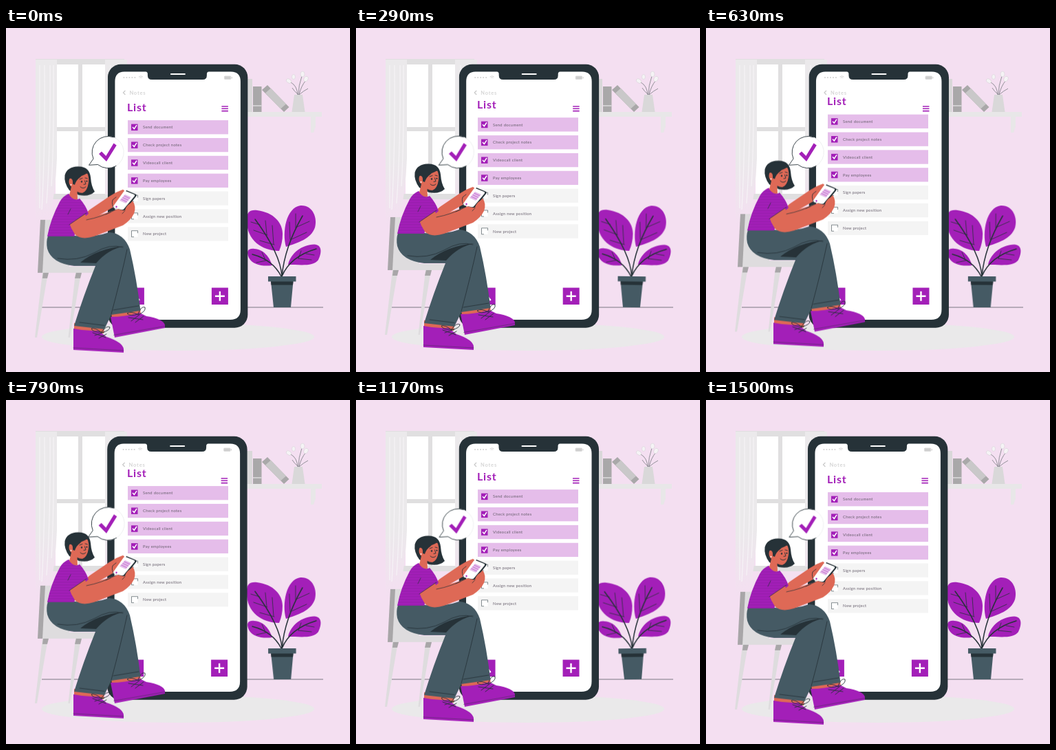
An HTML page that plays this animation: 500 px wide and 500 px high, repeating every 1540 ms.

```html
<!DOCTYPE html>
<html lang="en">
<head>
<meta charset="utf-8">
<title>Checklist</title>
<style>
html, body { margin: 0; width: 100%; height: 100%; overflow: hidden; background: #f4dff1; }
svg { display: block; width: 100vw; height: 100vh; }
text { font-family: Lato, "Open Sans", sans-serif; }
.ink { fill: #263238; }
.slate { fill: #455a64; }
.accent { fill: #a31fb8; }
.skin { fill: #de6956; }
.line { fill: none; stroke: #263238; stroke-linecap: round; stroke-linejoin: round; }
.shake, .float, .wind, .beat { animation: 1.54s linear infinite; }
.shake { animation-name: shake; }
.float { animation-name: float; }
.wind { animation-name: wind; transform-origin: 404px 332px; }
.beat { animation-name: beat; transform-origin: 148px 199px; }
@keyframes shake {
  0% { transform: translateX(-.1px); }
  8.6%, 86.6% { transform: translateX(-1px); }
  18.4%, 76.8% { transform: translateX(2px); }
  28.1%, 47.6%, 67.1% { transform: translateX(-4px); }
  37.9%, 57.3% { transform: translateX(4px); }
  96.3% { transform: none; }
  100% { transform: translateX(-.3px); }
}
@keyframes float {
  0% { transform: translateY(-.2px); }
  47.6% { transform: translateY(-10px); }
  96.3% { transform: translateY(0); }
  100% { transform: translateY(-.7px); }
}
@keyframes wind {
  0% { transform: rotate(.04deg); }
  23.3% { transform: rotate(1deg); }
  72% { transform: rotate(-1deg); }
  96.3% { transform: rotate(0deg); }
  100% { transform: rotate(.15deg); }
}
@keyframes beat {
  0% { transform: scale(1); }
  18.8% { transform: scale(1.01); }
  32.5% { transform: scale(.97); }
  51.3% { transform: scale(1.04); }
  65% { transform: scale(.97); }
  76%, 97.4% { transform: scale(.985); }
  100% { transform: scale(1); }
}
</style>
</head>
<body>
<svg viewBox="0 0 500 500">
  <defs>
    <pattern id="knit" width="8" height="4" patternUnits="userSpaceOnUse">
      <rect width="8" height="4" fill="#a31fb8"/>
      <path d="M0 2H8" stroke="#8a1a9c" stroke-width=".6"/>
    </pattern>
    <linearGradient id="drape" x2="0" y2="1">
      <stop offset=".6" stop-color="#ebe9eb"/>
      <stop offset="1" stop-color="#f4dff1"/>
    </linearGradient>
  </defs>

  <!-- window -->
  <g>
    <path fill="#fff" d="M72 52H146V242H72Z"/>
    <path fill="#e0dfe0" d="M43 45H172V53H43ZM105 53H111V242H105ZM72 144H148V150H72ZM60 241H150V249H60Z"/>
    <path fill="url(#drape)" d="M43 46H74V190Q72 240 62 285H43ZM144 46H176V242H144Z"/>
    <path d="M49 54V262M56 54Q57 180 52 264M64 54Q65 170 59 255M69 54Q70 160 66 230M152 54V236" fill="none" stroke="#f6f3f6" stroke-width="1.2"/>
  </g>

  <!-- shelf -->
  <g>
    <path fill="#e8e7e8" d="M340 122H459V129H340ZM443 129H450V143L447 152H443Z"/>
    <path fill="#d9d8d9" d="M340 74H358V122H340Z"/>
    <path fill="#a9a8a9" d="M359 85H371.500V122H359ZM372 90L380 83L411.500 115L404 122Z"/>
    <path fill="#c9c8c9" d="M377 94.500L385 87.500L407 110.500L399 117.500Z"/>
    <path d="M359 113H371.500" stroke="#dcdbdc" stroke-width="1.500"/>
    <path fill="#d9d8d9" d="M419 97H431L434.500 122H415.500Z"/>
    <path d="M424 97Q423 84 414 79M425 97Q425 84 430 70M426 97Q429 84 436 76M425 97Q418 91 416 87M426 97Q433 91 439 88" fill="none" stroke="#6b7074" stroke-width=".7"/>
    <g fill="#f5f3f5" stroke="#d2ced2" stroke-width=".5">
      <ellipse cx="411" cy="77" rx="4" ry="2.800" transform="rotate(35 411 77)"/>
      <ellipse cx="431" cy="67" rx="3" ry="4"/>
      <ellipse cx="436" cy="74" rx="3" ry="4" transform="rotate(30 436 74)"/>
      <ellipse cx="418" cy="71" rx="2.500" ry="3.500"/>
    </g>
  </g>

  <path d="M52 406H461" stroke="#263238" stroke-width=".6"/>
  <ellipse cx="250" cy="449" rx="198" ry="20" fill="#eae9ea"/>

  <!-- plant -->
  <g class="wind">
    <g class="accent">
      <path d="M397 324C372 324 350 308 350 281C349 267 355 264 365 265C389 268 402 283 402 299Q402 313 397 324Z"/>
      <path d="M407 318C401 297 407 261 428 258C446 257 453 276 449 290C443 307 424 312 407 318Z"/>
      <path d="M387 345C373 347 358 344 353 334C349 325 351 320 361 321C375 322 383 333 387 345Z"/>
      <path d="M410 344C414 327 430 315 448 314.500C460 315 459 327 454 337C447 347 428 344 410 344Z"/>
    </g>
    <path class="line" stroke-width="1.500" d="M401 361Q399 328 362 278M401 361Q405 318 431 273M400 361Q388 337 358 329M401 361Q413 332 451 321"/>
    <path class="line" stroke-width=".8" d="M389 314L387 287M379 300L377 280M390 315L369 309M380 301L360 294M369 286L356 282M413 307L412 282M421 290L421 270M413 308L437 297M421 290L441 281M377 337L372 326M378 338L364 341M425 335L429 324M425 335L444 337M436 328L448 330"/>
    <path class="slate" d="M381 361H421.500V368.500H381ZM385 368H417.500L414 406H389Z"/>
    <path class="ink" d="M385 368.500H417.500L417 373.500H385.500Z"/>
  </g>

  <!-- large phone -->
  <g class="shake">
    <rect class="ink" x="148" y="52.700" width="203.500" height="383" rx="19"/>
    <path fill="#fff" d="M172 63.500H203Q206 63.500 206 67V69Q206 75 212 75H286Q292 75 292 69V67Q292 63.500 295 63.500H327Q341 63.500 341 78V409Q341 424 326 424H173Q158.500 424 158.500 409V78Q158.500 63.500 172 63.500Z"/>
    <path d="M240 67H260" stroke="#fff" stroke-width="2" stroke-linecap="round"/>
    <path d="M171.500 72H189" stroke="#d4d4d4" stroke-width="2.200" stroke-linecap="round" stroke-dasharray="0 4"/>
    <path d="M193 71Q196 68.500 199 71M194.300 72.500Q196 71 197.700 72.500" fill="none" stroke="#d6d6d6"/>
    <rect x="317.500" y="70" width="9.500" height="4.500" rx="1" fill="#cfcfcf" stroke="#dcdcdc"/>
    <path d="M328.500 71V73.500" stroke="#d2d2d2"/>
    <path d="M173.500 91L170.500 94L173.500 97" fill="none" stroke="#c8c8c8" stroke-width="1.200"/>
    <text x="179.500" y="96.500" font-size="7.500" font-weight="700" letter-spacing=".8" fill="#d6d6d6">Notes</text>
    <path d="M313.500 114H323M313.500 117.300H323M313.500 120.600H323" stroke="#a31fb8" stroke-width="1.600"/>
    <path class="accent" d="M177 377.500H201V402H177ZM299 377.500H323V402H299Z"/>
    <path d="M304 389.700H318M311 382.700V396.700M184 383L194 396" stroke="#fff" stroke-width="2.400"/>
  </g>

  <!-- list -->
  <g class="float">
    <text class="accent" x="176" y="121" font-size="16" font-weight="700" letter-spacing=".8">List</text>
    <g id="rows"></g>
  </g>

  <!-- speech bubble -->
  <g class="beat">
    <path fill="#fff" d="M127 190L120.500 199.300L133.500 198.500A23.300 23.300 0 1 0 127 190Z"/>
    <path class="line" stroke-width=".9" d="M160 200.500A23.300 23.300 0 0 1 133.500 198.500L120.500 199.300L127 190A23.300 23.300 0 0 1 156 158.700"/>
    <path class="line" stroke-width=".5" opacity=".15" d="M156 158.700A23.300 23.300 0 0 1 160 200.500"/>
    <path class="accent" d="M135 183L139 179.500L145.300 186L156.500 167.500L160.700 170.500L146 194Z"/>
  </g>

  <!-- woman on chair -->
  <g class="float">
    <path fill="#dedcde" d="M53 279H92V347H129V356H47Z"/>
    <path fill="#a8a6a8" d="M50 279H57L53 356H46Z"/>
    <path fill="#dedcde" d="M53 356H61L45 450H42ZM101 356H109L93 450H90.500Z"/>
    <path fill="#a8a6a8" d="M54 356H62L60 364H53ZM102 356H110L108 364H100Z"/>

    <path class="skin" d="M99 429L143 435L142 444H99ZM153 413L195 407L196 418L154 423Z"/>
    <path class="accent" d="M98 437Q116 441 134 440L146 449Q170 457 171 467V472L98 468Z"/>
    <path class="accent" d="M152 420Q173 420 194 414L204 419Q229 423 231 432V436L158 450Z"/>
    <path class="line" stroke-width=".4" d="M98 465L171 469M156.500 446.500L231 433.500"/>
    <path class="line" stroke-width=".9" d="M126 443L145 450M129 447L143 442M135 451L146 445M139 442Q146 432 151 435Q151 440 139 443Q129 435 124 437Q126 443 139 442M178 421L199 424M182 426L194 417M188 428L200 419M192 416Q196 404 202 406Q204 412 192 417Q182 411 176 415Q180 420 192 416"/>
    <path class="slate" d="M61 302H99Q128 305 150 297Q172 299 180 322Q190 365 195.500 411L153 417L143 438L99 433Q113 388 130 346L99 346Q66 342 60 321Q58 311 61 302Z"/>
    <path class="ink" d="M108 341Q132 321 172 317Q148 322 131 342Z"/>
    <path class="line" stroke-width=".8" d="M75 335Q104 340 128 327Q151 313 170 319M176 322Q168 360 153 416M107 428L143 432.500M156 410L193 404"/>

    <path class="skin" d="M112 273L122 264L150 245Q163 237 170 235Q175 238 171 242L157 260L120 281Z"/>
    <path fill="url(#knit)" d="M91 241L97 247Q102 251 107 248Q116 258 120 270L107 281L99 303H60Q65 277 78 253Q82 245 91 241Z"/>
    <path class="skin" d="M91 281L113 266Q115 274 120 276Q148 269 163 263Q174 251 183 250Q190 259 186 270Q181 280 170 287L128 303Q109 309 100 300Q94 291 91 281Z"/>
    <path fill="url(#knit)" d="M98 253Q111 252 117 269L92 286Q86 271 98 253Z"/>
    <path class="line" stroke-width=".7" d="M92 286L117 269M117 279Q139 275 160 264M90 271L94 263M169 270Q176 263 180 257M145 271L152 268"/>

    <path class="ink" d="M175 236L188 241.500Q191 243 189 245L174 264Q172 266 169 265L158 262Z"/>
    <path fill="#fff" d="M173.500 237L186 242Q188 243 186.500 245L171.500 263Q170 265 167 264L157 262Q154.500 261 156 259L171 238Q172 236.500 173.500 237Z"/>
    <path fill="#e5bdea" d="M173 242L182 246L174 255L165 251Z"/>
    <path d="M171.500 244L180 248M169.500 246.500L178 250.500M167.500 249L176 253" stroke="#a31fb8" stroke-width=".5"/>
    <circle class="accent" cx="160.500" cy="260" r="1.200"/>
    <path class="skin" d="M173 265Q174 259 182 254L186 257Q186 266 179 271Z"/>
    <path class="line" stroke-width=".8" d="M157 262Q153 257 155 250L160 246"/>

    <!-- head -->
    <path class="ink" d="M104 201.500C117 201 122 208 123 217Q124 231 129 238Q121 246 106 243L92 236Q84 225 85.500 214Q89 202 104 201.500Z"/>
    <path class="skin" d="M98 215Q110 217 118 211Q121 217 120 225Q118 238 111 240Q107 240 103.500 238L104 249Q98 251 92 243L95 231Q90 227 92 220Q94 216 98 218Z"/>
    <path class="ink" d="M89 216Q91 206 103 204Q117 204 120 212Q113 211 108 217Q102 221 100 228L97 227Q98 217 91 219Z"/>
    <path class="line" stroke-width=".9" d="M107 220L111 218.500M115 218L118.500 219M114.500 222L116 227L113 227.500M108 231Q112 235 116 231"/>
    <circle class="ink" cx="110" cy="223.500" r="1.200"/>
    <circle class="ink" cx="117.500" cy="222.800" r="1.100"/>
    <circle cx="94.500" cy="228" r="1" fill="#fff"/>
  </g>
</svg>
<script>
const tasks = ["Send document", "Check project notes", "Videocall client", "Pay employees",
  "Sign papers", "Assign new position", "New project"];
const doneCount = 4;

const ticked = `<rect class="accent" x="182" y="5.500" width="9.500" height="9.500"/>
  <path d="M184 10L186.300 12.500L190 7" fill="none" stroke="#fff" stroke-width="1.500"/>`;
const empty = `<rect x="182.500" y="5.500" width="9" height="9" fill="#fff"/>
  <path d="M186 14.500H182.500V5.500H191.500V9" fill="none" stroke="#37434a" stroke-width=".6"/>`;

document.getElementById("rows").innerHTML = tasks.map((task, i) => {
  const done = i < doneCount;
  return `<g transform="translate(0 ${134.3 + i * 25.85})">
    <rect x="177" width="146" height="20.300" fill="${done ? "#e5bdea" : "#f4f4f4"}"/>
    ${done ? ticked : empty}
    <text x="199" y="12.300" font-size="5.800" letter-spacing=".3" fill="#675f6c">${task}</text>
  </g>`;
}).join("");
</script>
</body>
</html>
```
